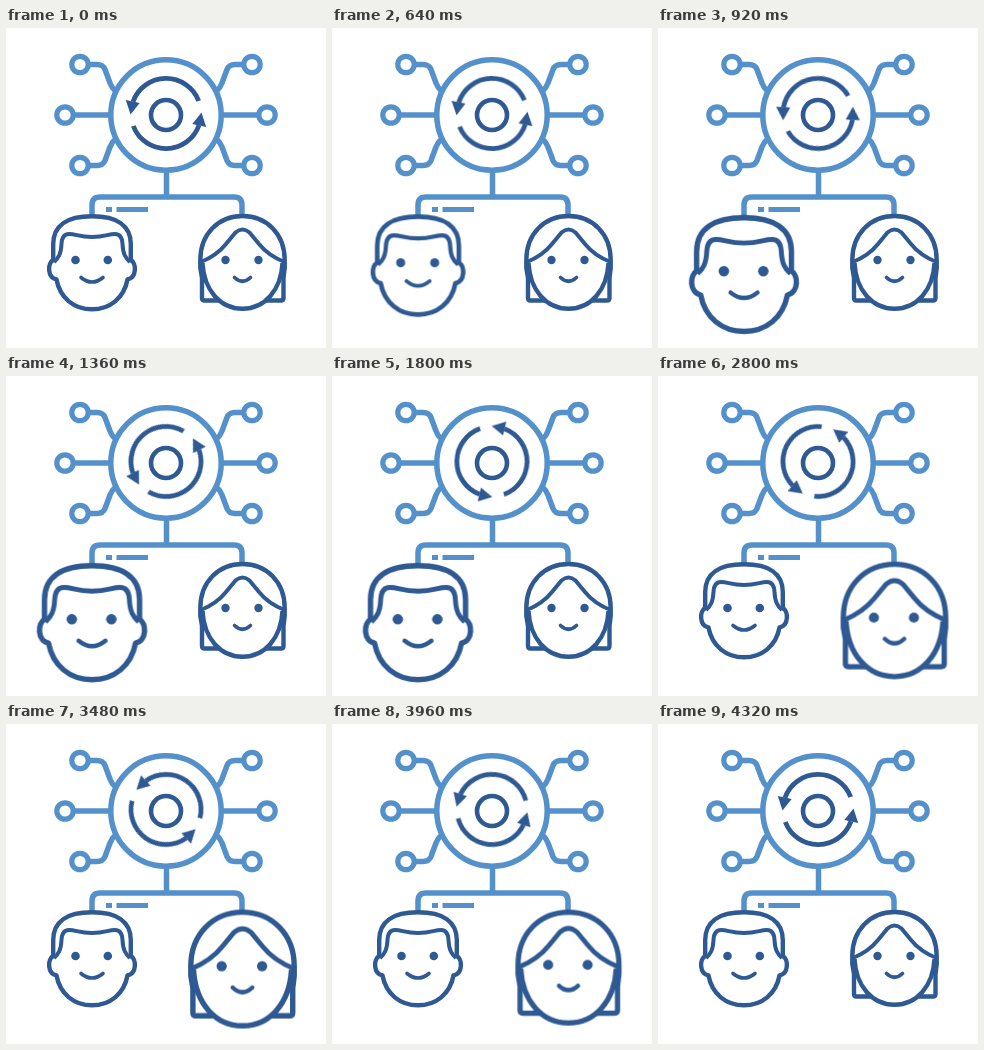
An HTML page for the animation above (4.84 s loop, 320 px wide and 320 px high).

```html
<!DOCTYPE html>
<html lang="en">
<head>
<meta charset="utf-8">
<title>Shared hub</title>
<style>
  html, body { margin: 0; width: 100%; height: 100%; overflow: hidden; background: #fff; }
  svg { display: block; width: 100vw; height: 100vh; }

  .light, .dark { fill: none; stroke-linejoin: round; }
  .light { stroke: #5491cb; stroke-width: 5.5; }
  .dark { stroke: #2e5992; stroke-width: 4.4; }
  .node { stroke-width: 5.2; }
  .solid { fill: #2e5992; stroke: none; }
  .skin { fill: #fff; }
  .line { stroke-width: 4; }
  .mouth { stroke-width: 3.6; stroke-linecap: round; }

  /* 4840 ms loop: still for 480 ms, eight beats of 480 ms, still for 520 ms */
  .arrows, .man, .woman { animation: 4840ms ease-in-out infinite; }
  .arrows { animation-name: turn; transform-origin: 0 -1.5px; }
  .man { animation-name: man; transform-origin: 86px 182px; }
  .woman { animation-name: woman; transform-origin: 236.5px 187px; }

  @keyframes turn {
    0%, 9.917% { transform: rotate(0deg); }
    89.256%, 100% { transform: rotate(-360deg); }
  }
  @keyframes man {
    0%, 9.917%, 49.587%, 100% { transform: scale(1); }
    19.835%, 39.669% { transform: scale(1.225); }
  }
  @keyframes woman {
    0%, 49.587%, 89.256%, 100% { transform: scale(1); }
    59.504%, 79.339% { transform: scale(1.225); }
  }
</style>
</head>
<body>
<svg viewBox="0 0 320 320">
  <defs>
    <g id="corner">
      <circle class="node" cx="-86" cy="-50.5" r="8.2"/>
      <path d="M-77-50.5H-69Q-63-50.5-61-45.5L-56-32Q-54.5-27.5-50.5-24"/>
    </g>
    <g id="side">
      <use href="#corner"/>
      <use href="#corner" transform="scale(1 -1)"/>
      <circle class="node" cx="-101" cy="0" r="8.2"/>
      <path d="M-92 0H-55"/>
    </g>
    <g id="arrow">
      <path stroke-width="4.8" d="M32.7-12.5A35 35 0 0 0-33-11.7"/>
      <path class="solid" d="M-40.2-13.6L-26.3-10.6L-35.5 1Z"/>
    </g>
  </defs>

  <g class="light">
    <path d="M160.5 142V169M86 188V177Q86 169 94 169H228Q236 169 236 177V188"/>
    <path stroke-width="5" d="M100 181.5H106M110.5 181.5H142"/>
  </g>

  <g transform="translate(160 87)">
    <g class="light">
      <use href="#side"/>
      <use href="#side" transform="scale(-1 1)"/>
      <circle class="skin" r="55.2"/>
    </g>
    <g class="dark">
      <circle r="15" stroke-width="4.6"/>
      <g class="arrows">
        <g transform="translate(0 -1.5)">
          <use href="#arrow"/>
          <use href="#arrow" transform="rotate(180)"/>
        </g>
      </g>
    </g>
  </g>

  <g class="dark man">
    <path class="skin" d="M47.2 232C41.5 235 41 249.5 50.5 251.5C54 270 68 281.3 86 281.3S118 270 121.500 251.500C131 249.500 130.500 235 124.800 232V216C124.800 197.500 111 188.300 86 188.300S47.200 197.500 47.200 216Z"/>
    <path class="line" d="M48 234C52.500 230 55 226 55.500 216Q56 206 63 206C70 206 73 209 86 209S102 206 109 206Q116 206 116.500 216C117 226 119.500 230 124 234"/>
    <circle class="solid" cx="69.500" cy="232" r="4.300"/>
    <circle class="solid" cx="101.800" cy="232" r="4.300"/>
    <path class="mouth" d="M75 249.500Q86 258.500 97 249.500"/>
  </g>

  <g class="dark woman">
    <path class="skin" d="M214 272.500H198.500Q196 272.500 196 270V250L194.300 240V232C194.300 206 212.500 188 236.500 188S278.700 206 278.700 232V240L277.500 250V270Q277.500 272.500 275 272.500H259"/>
    <path class="skin" d="M196.500 235C198 262 214 280.700 236.500 280.700S275 262 276.500 235"/>
    <path class="skin line" d="M195 234C207 229 214 223.500 220 216L229.500 204.500Q236.500 198.500 243.500 204.500L253 216C259 223.500 266 229 278.500 234"/>
    <circle class="solid" cx="219.500" cy="232" r="4.200"/>
    <circle class="solid" cx="252.500" cy="232" r="4.200"/>
    <path class="mouth" d="M228.500 249.500Q236.500 257 244.500 249.500"/>
  </g>
</svg>
</body>
</html>
```
